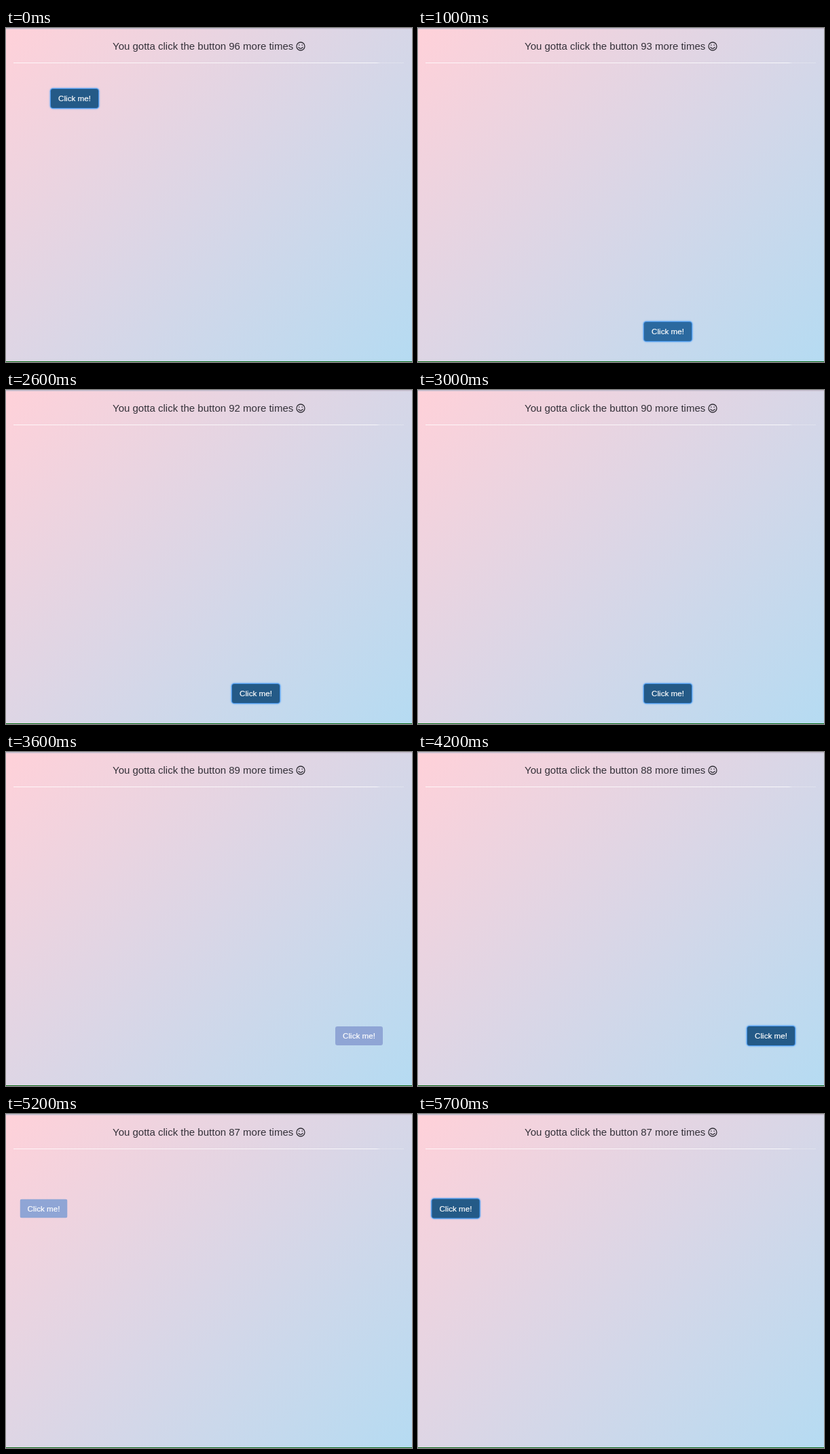
Animation of 598 by 493 pixels, one loop 5.8 s. Source, as an HTML page:

```html
<!DOCTYPE html>
<html lang="en">
<head>
<meta charset="utf-8">
<title>Click the button</title>
<style>
html, body { margin: 0; width: 100%; height: 100%; overflow: hidden; }

#stage {
  --loop: 5800ms step-end infinite;
  position: relative;
  width: 598px;
  height: 493px;
  overflow: hidden;
  background: linear-gradient(135deg, #ffd1d9, #dad6e6 50%, #b5dbf2);
  font-family: "Liberation Sans", Arial, sans-serif;
  animation: state var(--loop);
}
#stage > * { position: absolute; }

.top { left: 0; top: 0; width: 100%; height: 2px; background: linear-gradient(#b9b3c6, #d5cbd8aa); }
.bottom { left: 0; bottom: 0; width: 100%; height: 1px; background: #0a6b14; }
.rule {
  left: 11px; top: 51px; width: 575px; height: 1px;
  background: linear-gradient(90deg, #fffc 93%, #fff4 94%);
}
.title { left: 157px; top: 18px; font-size: 15px; line-height: 18px; color: #333038; white-space: pre; }
.smiley { left: 427px; top: 20px; fill: none; stroke: #333038; stroke-width: 1.3; stroke-linecap: round; }

.button {
  left: 0; top: 0; width: 70px; height: 28px;
  border-radius: 3.3px;
  background: var(--face);
  box-shadow: var(--ring);
  color: #fff;
  font-size: 11.67px;
  line-height: 28px;
  text-align: center;
  -webkit-text-stroke: .2px #fff;
  animation: place var(--loop);
}

.pointer { left: 0; top: 0; width: 0; height: 0; overflow: visible; animation: travel 5800ms step-end infinite; }
.hand { visibility: var(--hand); fill: #fff; stroke: #111; stroke-linejoin: round; stroke-width: 1; }
.arrow { visibility: var(--arrow); fill: #000; stroke: #fff; stroke-width: .9; }
.press { fill: none; stroke: #16141c; stroke-width: 1.3; animation: press var(--loop); }

/* hovered, moved away with focus, then blurred */
@keyframes state {
  0%, 39.655%, 63.793%, 94.828%, 100% {
    --face: #245a87; --ring: 0 0 0 1px #4a97ea, 0 0 2px 1.5px #5fa8f2;
    --hand: visible; --arrow: hidden;
  }
  12.069%, 55.172%, 75.862% {
    --face: #2b699f; --ring: 0 0 0 1px #4a97ea, 0 0 2px 1.5px #5fa8f2;
    --hand: hidden; --arrow: visible;
  }
  24.138%, 60.345%, 81.034% {
    --face: #8fa5d5; --ring: none;
    --hand: hidden; --arrow: visible;
  }
}
@keyframes place {
  0% { transform: translate(66px, 90px); }
  12.069% { transform: translate(333px, 434px); }
  55.172% { transform: translate(485px, 405px); }
  75.862%, 100% { transform: translate(20.5px, 125.5px); }
}
@keyframes travel {
  0%, 24.138% { transform: translate(102px, 105px); }
  25.862% { transform: translate(170px, 161px); }
  27.586% { transform: translate(320px, 285px); }
  29.31% { transform: translate(445px, 388px); }
  31.034%, 32.759% { transform: translate(491px, 426px); }
  34.483% { transform: translate(480px, 430px); }
  36.207% { transform: translate(440px, 441px); }
  37.931% { transform: translate(400px, 452px); }
  39.655%, 58.621% { transform: translate(378.5px, 458px); }
  60.345% { transform: translate(450px, 448px); }
  62.069% { transform: translate(533.5px, 437px); }
  63.793%, 79.31% { transform: translate(543px, 431px); animation-timing-function: step-end; }
  81.034% { transform: translate(520px, 417px); animation-timing-function: steps(5, end); }
  89.655% { transform: translate(229px, 237px); }
  91.379% { transform: translate(160px, 195px); }
  93.103% { transform: translate(112px, 165px); }
  94.828%, 100% { transform: translate(90.5px, 151.5px); }
}
@keyframes press {
  0%, 43.103%, 68.966%, 100% { visibility: hidden; }
  41.379%, 67.241%, 96.552% { visibility: visible; }
}
</style>
</head>
<body>
<div id="stage">
  <div class="top"></div>
  <div class="title">You gotta click the button <span id="count">96</span> more times</div>
  <svg class="smiley" width="14" height="14">
    <circle cx="7" cy="7" r="6"/>
    <path d="M3.9 8.4Q7 12.4 10.1 8.4M4.8 4.9v.5M9.2 4.9v.5"/>
  </svg>
  <div class="rule"></div>
  <div class="button">Click me!</div>
  <svg class="pointer">
    <path class="arrow" d="M0 0V11.2L2.6 8.8L4.3 12.6L6.3 11.7L4.6 8H8Z"/>
    <path class="hand" d="M-1.4 1.2Q-.2-.4 1 1.2L2 4.6Q3.4 3.8 4.2 5Q5.6 4.4 6.2 5.7Q8 5.3 8.1 7.2Q8.2 9.4 7 11V13.4H.6V12Q-1.6 10.2-3.4 7.6Q-3.2 6-1.6 6.8L-.3 7.8Z"/>
    <circle class="press" cy="-.5" r="25.3"/>
  </svg>
  <div class="bottom"></div>
</div>
<script>
const LOOP = 5800;
const FIRST = 96;
const clicks = [200, 500, 700, 2500, 2800, 3000, 3200, 4000, 4400];
const count = document.getElementById('count');
let start;

function tick(now) {
  start ??= now;
  const time = (now - start) % LOOP;
  const left = String(FIRST - clicks.filter(at => at <= time).length);
  if (count.textContent !== left) count.textContent = left;
  requestAnimationFrame(tick);
}
requestAnimationFrame(tick);
</script>
</body>
</html>
```
